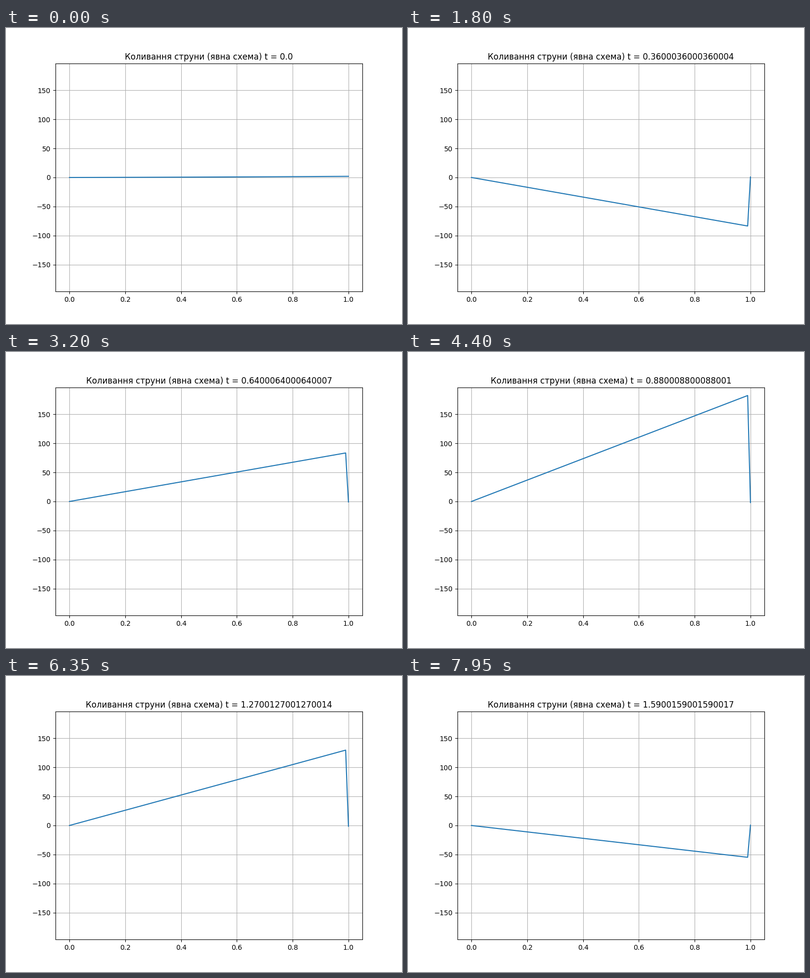
These frames come from a looping animation (800 by 600 pixels, 8 s). A matplotlib script:

```python
import numpy as np
import matplotlib.pyplot as plt
from matplotlib.animation import FuncAnimation

FRAMES = 160
STRIDE = 100  # time layers per drawn frame

x = np.linspace(0, 1, 101)
times = np.linspace(0, 10, 100000)


def profile(t):
    """String shape: a swinging straight line with a driven right end."""
    if t == 0:
        return x * (x + 1)
    u = -198 * x * np.cos(np.pi * t)
    u[-1] = 2 * np.cos(np.pi * t)
    return u


fig, ax = plt.subplots(figsize=(8, 6), dpi=100)
line, = ax.plot(x, profile(0))
ax.set_xlim(-0.05, 1.05)
ax.set_ylim(-196.02, 196.02)
ax.grid(True)
title = ax.set_title("")


def update(i):
    t = float(times[i * STRIDE])
    line.set_ydata(profile(t))
    title.set_text(f"Коливання струни (явна схема) t = {t}")
    return line, title


anim = FuncAnimation(fig, update, frames=FRAMES, interval=50,
                     repeat=True, repeat_delay=0, blit=False)
plt.show()
```
